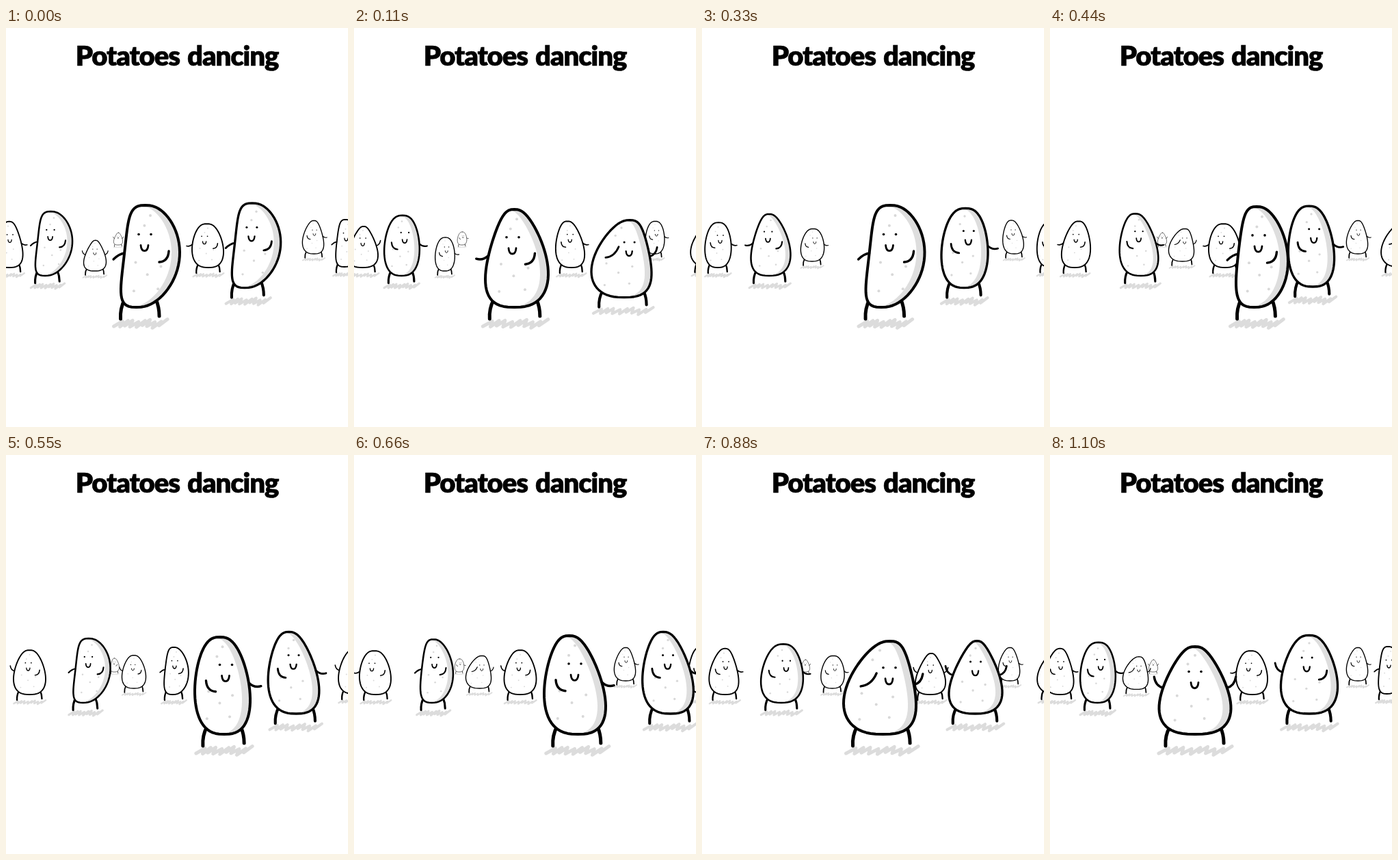
An HTML page with a canvas that plays this animation: 500 by 583 pixels, repeating every 1.21 s.

```html
<!DOCTYPE html>
<html lang="en">
<head>
<meta charset="utf-8">
<title>Potatoes dancing</title>
<style>
  html, body { margin: 0; width: 100%; height: 100%; overflow: hidden; background: #fff; }
  canvas { position: absolute; left: 0; top: 0; }
  h1 {
    position: absolute; z-index: 1; left: 0; top: 16px; width: 500px; margin: 0;
    font: 900 40px/48px Lato, sans-serif; letter-spacing: -1.1px; word-spacing: 3px;
    -webkit-text-stroke: .6px #000; text-align: center; white-space: nowrap; color: #000;
  }
</style>
</head>
<body>
<h1>Potatoes dancing</h1>
<canvas id="stage" width="500" height="583"></canvas>
<script>
const ctx = document.getElementById('stage').getContext('2d');
const STEP = 110, STEPS = 11;
const KEY_STEPS = [0, 1, 2, 4, 6, 8, 10];

// Arm strokes (start, control, end) measured outwards from the body's edge.
const ARMS = {
  down: [0, 0, 8, 1, 16, 9],
  out: [0, 0, 8, 8, 18, 5],
  up: [0, 0, 11, -3, 13, -16],
  fold: [-16, -3, -17, 12, -30, 13],
  wave: [-20, 2, -36, 0, -43, -17]
};

// taper narrows the head, lean shifts it sideways, bend pushes the belly out,
// face is the sideways offset of the face.
const pose = (w, h, taper, lean, bend, face, left, right) =>
  ({ w, h, taper, lean, bend, face, left, right });
const POSES = {
  A: pose(86, 149, .05, .16, .4, -8, 'down', 'fold'),
  B: pose(92, 143, .36, 0, .1, -6, 'out', 'fold'),
  C: pose(100, 138, .27, 0, 0, -4, 'up', 'fold'),
  D: pose(76, 147, .17, .05, .3, -5, 'down', 'fold'),
  E: pose(90, 144, .3, -.15, 0, 0, 'fold', 'out'),
  F: pose(106, 136, .33, .1, -.18, 14, 'wave', 'up'),
  G: pose(105, 128, .42, 0, 0, 0, 'up', 'up'),
  H: pose(82, 140, .12, .03, 0, 7, 'fold', 'out'),
  I: pose(81, 142, .17, -.08, 0, 5, 'fold', 'out'),
  J: pose(94, 128, .48, .04, 0, 0, 'up', 'up'),
  K: pose(98, 136, .19, .05, 0, 10, 'fold', 'out')
};

// Lower case letters are the mirrored poses.
for (const [name, p] of Object.entries(POSES)) {
  POSES[name.toLowerCase()] =
    pose(p.w, p.h, p.taper, -p.lean, -p.bend, -p.face, p.right, p.left);
}

// Back to front: one pose per step, body centres at KEY_STEPS.
// A dancer may come forward by `forward` pixels around the step `when`.
const dancer = (scale, ground, poses, xs, forward = 0, when = 0) =>
  ({ scale, ground, poses, xs, forward, when });
const DANCERS = [
  dancer(.14, 317, 'JKAEJBKHJKJ', [164, 158, 164, 164, 154, 151, 151]),
  dancer(.34, 330, 'bHkEbKbHbJb', [449, 440, 461, 449, 396, 449, 449]),
  dancer(.35, 341, 'JHDKFCFJKAF', [130, 133, 131, 192, 182, 191, 125], 18, .5),
  dancer(.47, 350, 'bJkHeCkJbFb', [3, 13, 9, 38, 31, 32, 13]),
  dancer(.47, 350, 'kEkBkDCFJHk', [295, 316, 325, 255, 243, 334, 295]),
  dancer(.47, 349, 'DFFHFCEJFAD', [500, 517, 509, 509, 510, 515, 498]),
  dancer(.63, 362, 'AHGBEADCKFH', [70, 70, 71, 130, 121, 117, 70]),
  dancer(.83, 378, 'AFHHIEEBJKC', [366, 391, 386, 382, 459, 400, 379], 20, 1.5),
  dancer(1, 408, 'ABCADIEHFJG', [211, 238, 255, 310, 323, 260, 212])
];
const SPOTS = [[0, .1], [-.1, .2], [-.25, .56], [.18, .6], [-.05, .68], [-.28, .84], [.13, .82]];

function centreAt(xs, step) {
  const next = KEY_STEPS.findIndex(k => k >= step);
  return KEY_STEPS[next] === step ? xs[next] : (xs[next - 1] + xs[next]) / 2;
}

// Horizontal edge of the body at u: 1 is the top, -1 the bottom.
function rawEdge(p, u, side) {
  const spine = p.lean * u + p.bend * (.5 - u * u);
  return spine + side * Math.max(0, 1 - u * u) ** .375 * (1 - p.taper * u);
}

// Adds the outline and an edge function, fitted to the pose's width.
function shape(p) {
  const ring = Array.from({ length: 72 }, (_, i) => {
    const a = i * Math.PI / 36, u = Math.cos(a);
    return [rawEdge(p, u, Math.sign(Math.sin(a))), -p.h * (1 + u) / 2];
  });
  const xs = ring.map(([x]) => x);
  const min = Math.min(...xs), max = Math.max(...xs);
  const fit = x => ((x - min) / (max - min) - .5) * p.w;
  p.outline = new Path2D();
  for (const [x, y] of ring) p.outline.lineTo(fit(x), y);
  p.outline.closePath();
  p.edge = (y, side) => fit(rawEdge(p, -2 * y / p.h - 1, side));
}
Object.values(POSES).forEach(shape);

function curve(x, y, cx, cy, ex, ey) {
  ctx.beginPath();
  ctx.moveTo(x, y);
  ctx.quadraticCurveTo(cx, cy, ex, ey);
  ctx.stroke();
}

function dot(x, y, r) {
  ctx.beginPath();
  ctx.arc(x, y, r, 0, 7);
  ctx.fill();
}

function drawShadow(left, right) {
  const n = 17;
  ctx.strokeStyle = '#dcdcdc';
  ctx.lineWidth = 5;
  ctx.beginPath();
  for (let i = 0; i <= n; i++) {
    const slant = (i % 2 ? 1 : -1) * (4 + Math.sin(i * 2.3));
    ctx.lineTo(left + (right - left) * i / n + slant, 24 - slant + 1.5 * Math.sin(i));
  }
  ctx.stroke();
}

function drawLegs(p) {
  const hipY = -p.h * .08;
  const hips = [p.edge(hipY, -1) + 4, p.edge(hipY, 1) - 4];
  drawShadow(hips[0] - 12, hips[1] + 12);
  ctx.strokeStyle = '#000';
  curve(hips[0], hipY, hips[0] - 7, 2, hips[0] - 6, 17);
  curve(hips[1], hipY, hips[1] + 5, 0, hips[1] + 5, 13);
}

function drawSkin(p, shaded) {
  ctx.save();
  ctx.clip(p.outline);
  ctx.fillStyle = shaded ? '#dedede' : '#fff';
  ctx.fill(p.outline);
  ctx.translate(-12, 0);
  ctx.fillStyle = '#fff';
  ctx.fill(p.outline);
  ctx.translate(12, 0);
  ctx.fillStyle = '#d8d8d8';
  for (const [x, y] of SPOTS) dot(x * p.w, (y - 1) * p.h, 2);
  ctx.restore();
}

function drawArm(p, kind, side) {
  const y = -p.h * .53, x = p.edge(y, side);
  curve(...ARMS[kind].map((v, i) => i % 2 ? y + v : x + side * v));
}

function drawFace({ face, h }, thin) {
  const y = -h * .715;
  ctx.fillStyle = '#000';
  dot(face - 9, y, thin * .65);
  dot(face + 9, y, thin * .65);
  ctx.lineWidth = thin;
  ctx.beginPath();
  ctx.moveTo(face - 6, y + 16);
  ctx.bezierCurveTo(face - 5, y + 27, face + 4, y + 27, face + 5, y + 16);
  ctx.stroke();
}

function drawPotato(p, scale) {
  const thin = Math.max(2.8, .6 / scale);
  ctx.lineWidth = Math.max(3.4, thin);
  const limb = ctx.lineWidth;
  ctx.save();
  drawLegs(p, limb);
  ctx.restore();
  ctx.strokeStyle = '#000';
  drawSkin(p, scale > .5);
  ctx.lineWidth = Math.max(4, thin);
  ctx.stroke(p.outline);
  ctx.lineWidth = limb;
  drawArm(p, p.left, -1);
  drawArm(p, p.right, 1);
  drawFace(p, thin);
}

function draw(now) {
  const step = Math.floor(now / STEP) % STEPS;
  ctx.clearRect(0, 0, 500, 583);
  ctx.lineCap = ctx.lineJoin = 'round';
  for (const { scale, ground, poses, xs, forward, when } of DANCERS) {
    const near = Math.max(0, Math.cos(2 * Math.PI * (step - when) / STEPS)) ** 6;
    ctx.save();
    ctx.translate(centreAt(xs, step), ground + forward * near);
    ctx.scale(scale, scale);
    drawPotato(POSES[poses[step]], scale);
    ctx.restore();
  }
}

const start = performance.now();
function tick() {
  draw(performance.now() - start);
  requestAnimationFrame(tick);
}
tick();
</script>
</body>
</html>
```
